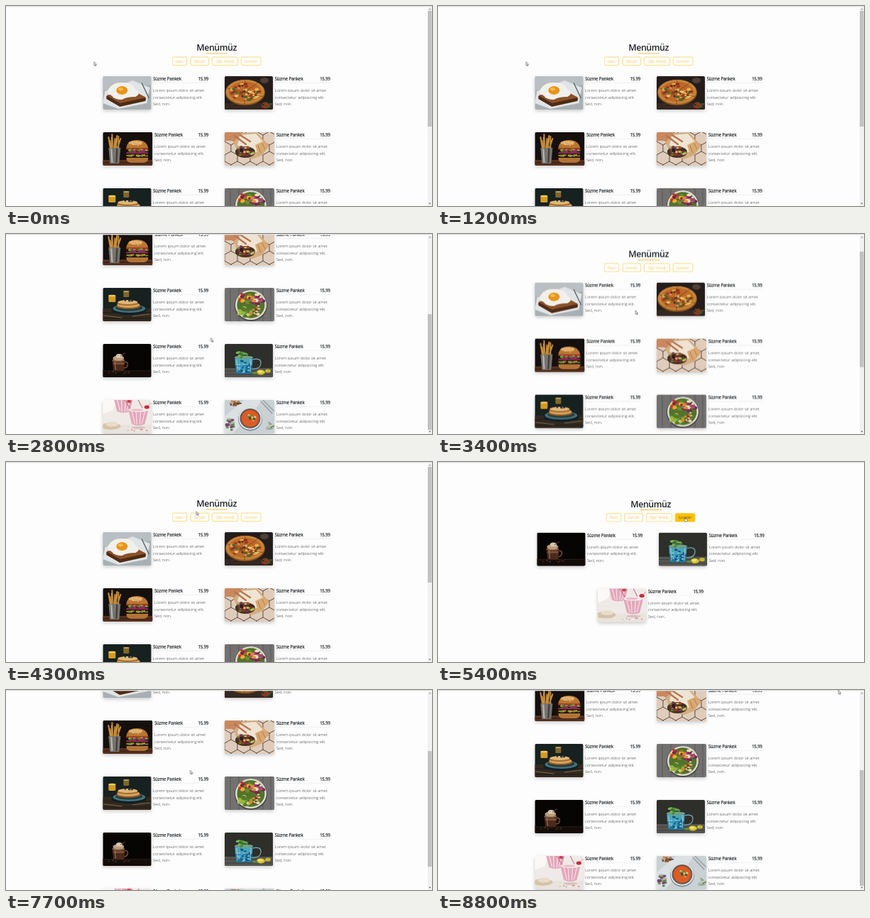
Write an HTML page that moves like this. It is 600 px wide and 282 px high and loops after 8.9 s.

```html
<!DOCTYPE html>
<html lang="tr">
<head>
<meta charset="utf-8">
<title>Menümüz</title>
<style>
  html, body { margin: 0; width: 100%; height: 100%; overflow: hidden; background: #fdfdfd; }
  svg { display: block; width: 100%; height: 100%; font-family: "Open Sans", "Noto Sans", sans-serif; }
  .heading { font-size: 12.3px; font-weight: 600; letter-spacing: -.4px; text-anchor: middle; fill: #212529; }
  .name { font-size: 6.3px; font-weight: 600; letter-spacing: -.33px; fill: #212529; }
  .price { text-anchor: end; }
  .desc { font-size: 6.2px; font-weight: 300; letter-spacing: -.17px; fill: #333; }
  .label { font-size: 4.7px; font-weight: 300; text-anchor: middle; fill: #ffb400; }
  .hover { visibility: hidden; }
  .hover .label { fill: #212529; }
  .photo { filter: drop-shadow(0 2.2px 2.4px rgba(0, 0, 0, .2)); }
</style>
</head>
<body>
<svg viewBox="0 0 600 282" preserveAspectRatio="none">
  <defs>
    <clipPath id="clip68"><rect width="68" height="47" rx="1.8"/></clipPath>
    <clipPath id="clip70"><rect width="70" height="47" rx="1.8"/></clipPath>
  </defs>
  <g id="page">
    <text class="heading" x="296.6" y="63.4">Menümüz</text>
    <rect x="282" y="66.5" width="30" height=".9" fill="#f5b925"/>
    <g id="buttons"></g>
    <g id="panels"></g>
  </g>
  <rect width="600" height="1.3" fill="#e2e2e2"/>
  <g id="scrollbar">
    <rect x="594" y="1" width="6" height="281" fill="#f1f1f1"/>
    <path d="M595.6 5.3l1.4-1.8 1.4 1.8z" fill="#777"/>
    <path d="M595.6 277.7l1.4 1.8 1.4-1.8z" fill="#505050"/>
    <rect id="thumb" x="594" y="7" width="5.6" height="163" fill="#c1c1c1"/>
    <rect id="longThumb" x="594" y="7" width="5.6" height="247" fill="#c1c1c1"/>
  </g>
  <g id="cursor" stroke="#222" stroke-width=".5" stroke-linejoin="round" fill="#fff">
    <path id="arrow" d="M0 0V5.1L1.2 4.1 2 5.9 2.8 5.5 2 3.8H3.6Z"/>
    <path id="hand" d="M-.5 .3Q0-.4 .5 .3V2.2L2.9 2.7Q3.4 2.9 3.3 3.6L2.8 5.8H.2L-1.6 3.5Q-1.4 2.7-.5 3.4Z"/>
  </g>
</svg>
<script>
const LOOP = 8900;
const $ = id => document.getElementById(id);

// Shape helpers for the dish pictures
const box = (x, y, w, h, fill, rx = 0) => `<rect x="${x}" y="${y}" width="${w}" height="${h}" rx="${rx}" fill="${fill}"/>`;
const oval = (x, y, rx, ry, fill) => `<ellipse cx="${x}" cy="${y}" rx="${rx}" ry="${ry}" fill="${fill}"/>`;
const shape = (d, fill) => `<path d="${d}" fill="${fill}"/>`;
const line = (d, color, width = 1) => `<path d="${d}" fill="none" stroke="${color}" stroke-width="${width}" stroke-linecap="round"/>`;
const backdrop = fill => box(0, 0, 70, 47, fill);

function scatter(seed, count, x, y, rx, ry, size, colors) {
  const random = () => (seed = (seed * 16807) % 2147483647) / 2147483647;
  let out = '';
  for (let i = 0; i < count; i++) {
    const angle = random() * Math.PI * 2, reach = Math.sqrt(random());
    out += oval((x + Math.cos(angle) * reach * rx).toFixed(1), (y + Math.sin(angle) * reach * ry).toFixed(1),
      (size * (.6 + random() * .7)).toFixed(1), (size * (.4 + random() * .5)).toFixed(1), colors[i % colors.length]);
  }
  return out;
}

function hexTiles() {
  let d = '';
  for (let row = -1; row < 5; row++)
    for (let col = -1; col < 5; col++)
      d += `M${col * 18 + (row & 1) * 9} ${row * 14 + 4}l9-5 9 5v9`;
  return line(d, '#4f4038', .9);
}

const shake = (x, y) => shape(`M${x - 14} ${y}h28l-5 20q-9 4-18 0z`, '#e2a6ba') +
  line(`M${x - 9} ${y + 3}l4 16M${x - 3} ${y + 3}l1 17M${x + 3} ${y + 3}l-1 17M${x + 9} ${y + 3}l-4 16`, '#f4dae2', 1.4) +
  oval(x, y, 14, 3, '#f7ebe9') + oval(x - 2, y, 9, 1.6, '#e7bcc8');

const dishes = {
  egg: { width: 68, art: backdrop('#a9b0b3') + shape('M0 0H68V12L0 20Z', '#b9bfc2') +
    shape('M3 21L42 6 66 16 62 38 22 46 0 38Z', '#e1e4e4') +
    shape('M5 28L38 21 61 31 60 35 24 43 5 32Z', '#4e2b16') + shape('M5 27L38 18 61 30 24 38Z', '#8b5229') +
    shape('M8 18Q14 8 28 9 42 8 46 19 55 24 46 29 33 29 27 33 16 33 12 27 4 25 8 18Z', '#f2f0ea') +
    oval(27, 20, 8, 6, '#e5961f') + oval(25, 18, 3.5, 2, '#f6bd4a') + line('M55 10L65 31', '#55585a', 1.3) },
  pizza: { width: 68, art: backdrop('#241d1b') + box(0, 38, 68, 9, '#352821') +
    oval(29, 23, 28, 18, '#8c5523') + oval(29, 22, 27, 17, '#c68338') + oval(29, 22, 23, 14, '#bd6829') +
    scatter(17, 60, 29, 22, 21, 12, 2.5, ['#e5b44e', '#a8361e', '#eec978', '#53672a', '#6f2c1a']) +
    line('M4 17L55 29M29 5L28 39M12 34L47 9', '#71401d', .7) +
    scatter(8, 13, 58, 40, 8, 5, 2.4, ['#3f5c25', '#a32c20']) + oval(56, 6, 6, 4, '#4e4038') },
  burger: { width: 70, art: backdrop('#15100e') + box(0, 39, 70, 8, '#54311f') + line('M0 43H70', '#2a170f', 1) +
    line('M11 25L8 7M14 24L13 3M17 24L20 5M20 24L25 9M12 24L10 12M22 23L22 6M16 23L17 9', '#c98b35', 2) +
    line('M12 23L12 7M19 23L20 9', '#e8bd68', .8) +
    shape('M8 22H25L23 44H10Z', '#77736e') + line('M12 24L13 42', '#bdb9b4', 2) + line('M20 24L19 42', '#45413e', 2.4) +
    shape('M33 23Q34 11 48 11T64 23Z', '#b97631') + oval(46, 15, 10, 3, '#dfab68') +
    scatter(9, 12, 48, 16, 11, 3, .7, ['#f1d9a5']) + box(33, 22, 31, 2.5, '#b23227', 1.2) +
    scatter(25, 22, 48, 26, 16, 1.4, 2.4, ['#7da02f', '#4c6d20', '#922b62']) + box(33, 28, 31, 2.6, '#8c285a', 1.2) +
    box(32, 30, 32, 5, '#2d1a13', 2) + scatter(31, 14, 48, 33, 15, 1.2, 2, ['#6d9130', '#d0952f']) +
    shape('M33 36H64Q64 43 57 43H40Q33 43 33 36Z', '#b27339') },
  wrap: { width: 70, art: backdrop('#dfccba') + hexTiles() +
    shape('M0 0H22L31 11 25 20 10 12 0 12Z', '#c98860') +
    shape('M13 14L24 1 45 0 62 18 54 32 39 38 20 33Z', '#d2ad85') + shape('M22 4L44 2 58 18 42 30 18 18Z', '#efe3d2') +
    line('M14 5L30 17M22 4L36 13', '#b8754f', 2.4) +
    oval(29, 28, 14, 8, '#47321f') + scatter(23, 32, 29, 27, 13, 7, 2.4, ['#668a35', '#2b1c16', '#a83b2b', '#d6b36b', '#733552']) +
    shape('M43 18L56 12 63 20 48 34Z', '#d9a873') + line('M47 19L51 29M53 16L57 24', '#a9703f', .8) },
  pancake: { width: 68, art: backdrop('#17211f') + box(0, 29, 68, 18, '#33291f') +
    line('M0 35H68M0 43H68', '#1a1a18', 1) + line('M2 39L27 42M42 40L66 37', '#82694a', 1) +
    oval(37, 31, 25, 7, '#0d2029') + oval(37, 29, 23, 6, '#477177') + oval(37, 28, 19, 4.5, '#243c40') +
    oval(36, 26, 17, 4, '#8c5727') + oval(36, 24, 16, 4, '#d5a45c') + oval(35, 22, 15, 3, '#a76d32') +
    oval(35, 20, 14, 3, '#dfb774') + scatter(6, 9, 35, 18, 7, 1.6, 1.5, ['#292e3a', '#f1dba9']) +
    box(8, 10, 10, 10, '#d39a25', 1.5) + oval(13, 11, 5, 1.3, '#edcc66') + box(29, 4, 8, 9, '#80662a', 1) +
    oval(33, 5, 4, 1, '#b1a069') },
  salad: { width: 70, art: backdrop('#737170') + line('M8 0V47M20 0V47M54 0V47M65 0V47', '#575655', .9) +
    oval(37, 25, 23, 22, '#484644') + oval(37, 24, 22, 21, '#dedbd3') + oval(37, 24, 19.5, 18.7, '#53722a') +
    scatter(31, 24, 29, 15, 9, 8, 3, ['#c93432', '#e3b02f', '#71264c', '#6d8c31']) +
    scatter(42, 26, 46, 17, 8, 10, 2.8, ['#74245a', '#e2873b', '#a14478', '#f0dfc0']) +
    scatter(5, 22, 28, 33, 9, 7, 3.2, ['#95b53f', '#547a2b', '#c7d277']) +
    scatter(12, 24, 43, 32, 9, 8, 2.3, ['#e7d6b5', '#d98a34', '#557a2e', '#7b3b2c']) },
  chocolate: { width: 68, art: backdrop('#070504') + box(0, 37, 68, 10, '#130c08') + line('M0 38H68', '#38241a', .7) +
    line('M29 26Q36 24 35 30 34 34 29 34', '#795139', 1.4) + shape('M13 23H31L30 38H15Z', '#4a291b') +
    box(15, 26, 15, 3, '#7e4f35') + line('M17 25L18 36', '#9d745a', 1.1) + oval(22, 23, 9, 2, '#8e6950') +
    oval(22, 20, 8, 3.6, '#b99c7e') + oval(23, 17, 4.5, 3, '#d8c5ab') + line('M25 17L31 13', '#64462f', 1) +
    scatter(9, 14, 27, 40, 20, 1.5, 1.1, ['#51331f', '#2d1b12']) },
  blue: { width: 68, art: backdrop('#2e2e2b') + box(0, 34, 68, 13, '#565552') + line('M0 38H68M0 43H68', '#3b3b39', .8) +
    line('M39 22Q52 19 51 28 50 36 38 35', '#6f9ea6', 1.4) + shape('M14 19H40L38 42H16Z', '#237496') +
    box(15, 21, 24, 9, '#4ba4b8') + scatter(15, 34, 27, 32, 10, 9, 1.8, ['#174f83', '#41a4cc', '#155577', '#79c2d7']) +
    line('M17 21L18 39M37 21L36 39', '#a9d3dc', .9) + oval(27, 19, 13, 2.3, '#759f88') +
    scatter(28, 20, 24, 15, 9, 4, 2.6, ['#4e8c39', '#80b050', '#316c31']) +
    oval(51, 40, 6, 3.5, '#d9c02c') + oval(50, 39, 3.6, 1.8, '#efdf6b') + oval(61, 38, 4, 2.6, '#c2b72f') + oval(43, 41, 4, 1.7, '#628b3b') },
  shake: { width: 68, art: backdrop('#efeae7') + shape('M0 0H20L14 14 0 20Z', '#faf9f7') + box(0, 35, 68, 12, '#e9e3de') +
    oval(11, 37, 14, 5, '#d6c2a8') + oval(13, 34, 9, 3.4, '#eadccb') + shake(29, -4) +
    line('M38 12L31 0M56 12L50 0', '#cf7187', 1.1) + shake(50, 14) + oval(50, 39, 10, 1.8, '#d8bfc3') +
    oval(62, 10, 3.6, 2.6, '#c22e3d') + oval(37, 2, 3, 2, '#c64353') + line('M63 9L67 5', '#7b473f', .6) +
    scatter(14, 12, 48, 43, 15, 2, 1.2, ['#d46979', '#d4b58d', '#f8f5f3']) },
  soup: { width: 70, art: backdrop('#c9d1d5') + shape('M0 23L28 0H54L12 47H0Z', '#dbe0e2') + line('M51 2L67 19M54 0L70 16', '#929a9d', 1.2) +
    scatter(19, 20, 13, 5, 9, 4, 2, ['#8c5737', '#b98053', '#643c29']) +
    scatter(41, 20, 7, 35, 7, 8, 2.2, ['#60804a', '#77456f', '#9cab8b']) +
    oval(36, 27, 17, 16.5, '#818b91') + oval(36, 26, 16.3, 15.8, '#e1e5e6') + oval(36, 26, 14.5, 14, '#59636a') +
    oval(36, 26, 13, 12.5, '#b7421a') + oval(36, 26, 12, 11.5, '#d95d25') +
    scatter(4, 18, 37, 25, 6, 5, 1.8, ['#344f28', '#f0d9ad', '#6d8838']) +
    scatter(37, 14, 64, 37, 5, 6, 1.8, ['#7f9672', '#a6b3a0']) },
};

const COLUMN = 171.5, ROW = 79;

function card(name, index, count) {
  const { width, art } = dishes[name];
  const alone = index === count - 1 && count % 2;
  const x = 136.4 + (alone ? COLUMN / 2 : index % 2 * COLUMN);
  const y = 99 + Math.floor(index / 2) * ROW;
  const left = width + 2.5, right = 148.6;
  const lines = ['Lorem ipsum dolor sit amet', 'consectetur adipisicing elit.', 'Sed, non.'];
  return `<g transform="translate(${x} ${y})">
    <g class="photo"><g clip-path="url(#clip${width})">${art}</g></g>
    <text class="name" x="${left}" y="5.9">Süzme Pankek</text>
    <text class="name price" x="${right}" y="5.9">15.99</text>
    ${line(`M${left} 9.4H${right}`, '#dedede', .4)}
    ${lines.map((text, i) => `<text class="desc" x="${left}" y="${22.2 + i * 9.375}">${text}</text>`).join('')}
  </g>`;
}

const menus = {
  all: Object.keys(dishes),
  breakfast: ['egg', 'pancake'],
  lunch: ['pizza', 'burger', 'wrap', 'salad', 'soup'],
  drinks: ['chocolate', 'blue', 'shake'],
};
$('panels').innerHTML = Object.entries(menus).map(([id, names]) =>
  `<g id="${id}">${names.map((name, i) => card(name, i, names.length)).join('')}</g>`).join('');

const tabs = [['Hepsi', 234.3, 20.4], ['Kahvaltı', 260, 25.6], ['Öğle Yemeği', 290.4, 36.2], ['İçecekler', 331.3, 27.6]];
$('buttons').innerHTML = tabs.map(([text, x, width], i) => {
  const tab = fill => `<rect x="${x}" y="72" width="${width}" height="11.6" rx="1.7" fill="${fill}" stroke="#ffc52b" stroke-width=".6"/>
    <text class="label" x="${x + width / 2}" y="79.6">${text}</text>`;
  return `<g>${tab('none')}</g><g class="hover" id="hover${i}">${tab('#ffc107')}</g>`;
}).join('');

// Tracks are lists of [ms, value, easing]
function animate(id, property, track) {
  const frames = track.map(([ms, value, easing = 'linear']) => ({ offset: ms / LOOP, [property]: value, easing }));
  $(id).animate(frames, { duration: LOOP, iterations: Infinity });
}
const move = (x, y) => `translate(${x}px, ${y}px)`;

function showDuring(id, ...spans) {
  const track = spans.flatMap(([from, to]) => [[from, 'visible', 'step-end'], [to, 'hidden', 'step-end']]);
  if (track[0][0] > 0) track.unshift([0, 'hidden', 'step-end']);
  const last = track[track.length - 1];
  if (last[0] === LOOP) last[1] = 'visible';
  else track.push([LOOP, 'hidden']);
  animate(id, 'visibility', track);
}

const scroll = [[0, 0], [1900, 0, 'ease-in-out'], [2700, 181], [2900, 181, 'ease-in-out'], [3600, 0],
  [7400, 0], [7700, 135], [7800, 135, 'ease-out'], [8000, 181], [LOOP, 181]];
const wide = move(3, .6), narrow = move(0, 0);
const pageTrack = scroll.map(([ms, y, easing]) => [ms, move(0, -y), easing]);
pageTrack.splice(5, 0, [4600, wide, 'step-end'], [4900, narrow, 'step-end'], [5300, wide, 'step-end'], [7300, narrow]);
pageTrack[4][2] = 'step-end';
animate('page', 'transform', pageTrack);
animate('thumb', 'transform', scroll.map(([ms, y, easing]) => [ms, move(0, y * 106 / 181), easing]));

showDuring('all', [0, 4600], [7300, LOOP]);
showDuring('breakfast', [4600, 4900]);
showDuring('lunch', [4900, 5300]);
showDuring('drinks', [5300, 7300]);
showDuring('scrollbar', [0, 4600], [4900, 5300], [7300, LOOP]);
showDuring('thumb', [0, 4600], [7300, LOOP]);
showDuring('longThumb', [4900, 5300]);

showDuring('hover0', [7030, 7400]);
showDuring('hover1', [4420, 4770], [6870, 7010]);
showDuring('hover2', [4800, 5150], [6650, 6840]);
showDuring('hover3', [5200, 6620]);
showDuring('hand', [4420, 7400]);
showDuring('arrow', [0, 4420], [7400, LOOP]);

animate('cursor', 'transform', [
  [0, 124, 78.7], [1300, 124, 78.7, 'ease-in-out'], [1700, 101, 92], [1900, 101, 92, 'ease-in-out'],
  [2600, 288.6, 146.6], [2900, 288.6, 146.6, 'ease-in-out'], [3600, 276, 100], [4300, 268, 69.5], [4400, 268, 69.5],
  [4600, 274, 77], [4700, 274, 77], [4900, 308, 78], [5000, 308, 78], [5300, 345, 78], [5700, 357.6, 78.3],
  [6500, 357.6, 78.3], [7100, 246, 78], [7350, 246, 78], [7700, 259.5, 113.3], [7800, 259.5, 113.3],
  [8200, 262, 118, 'ease-in-out'], [8700, 564, .4], [LOOP, 564, .4],
].map(([ms, x, y, easing]) => [ms, move(x, y), easing]));
</script>
</body>
</html>
```
